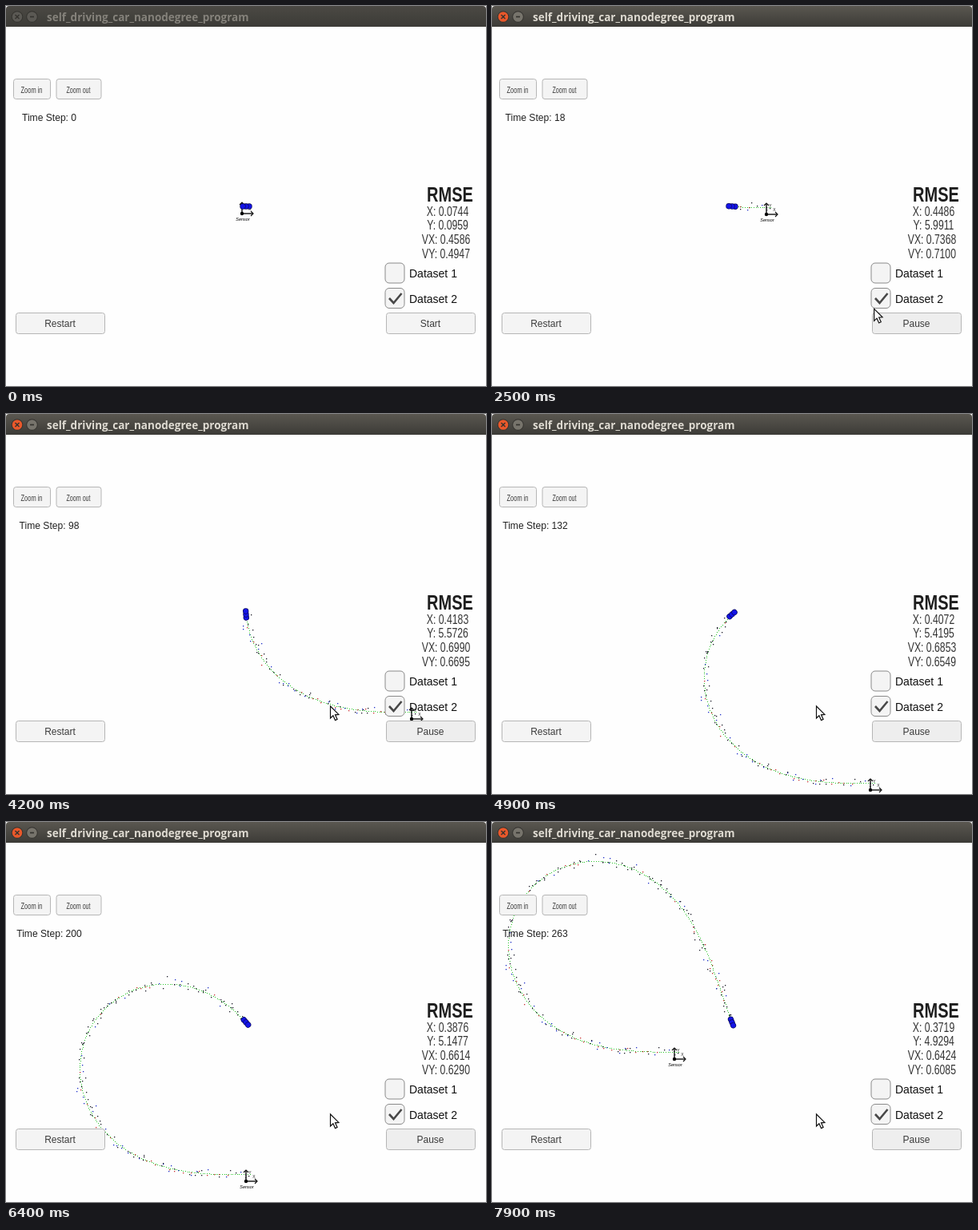
An HTML page with a canvas that plays this animation: 600x476 px, repeating every 8 s.

```html
<!DOCTYPE html>
<html lang="en">
<head>
<meta charset="utf-8">
<title>Tracking simulator</title>
<style>
html, body { margin: 0; width: 100%; height: 100%; overflow: hidden; background: #fefefe; }
canvas { display: block; }
</style>
</head>
<body>
<canvas id="stage" width="600" height="476"></canvas>
<script>
const ctx = document.getElementById('stage').getContext('2d');
const LOOP = 8000, TICK = 100, START = 2100, LAST_STEP = 270;
const CENTER = { x: 300, y: 251 };
const SANS = '"Liberation Sans", Arial, sans-serif';

// The pointer rests between glides: start, end, from, to
const GLIDES = [
  [100, 700, [82, 7], [558, 233]],
  [1000, 1700, [558, 233], [524, 388]],
  [2200, 2900, [524, 388], [405, 366]]
];

// RMSE is a large squared error diluted over the steps: idle value, initial sum, growth per step
const ERRORS = {
  X: [.0744, 103.1, .0066],
  Y: [.0959, 18413, .02],
  VX: [.4586, 276, .14],
  VY: [.4947, 257, .09]
};

const random = n => { const x = Math.sin(n * 127.1 + 3.7) * 43758.5453; return x - Math.floor(x); };
const spread = n => random(n) + random(n + .31) + random(n + .67) - 1.5;

// The car's yaw swings as a cosine, and it is a little faster in the middle of the turn
function drive() {
  const track = [];
  let x = 5, y = -9;
  for (let i = 0; i <= LAST_STEP; i++) {
    const phase = Math.PI * (i + .5) / 248;
    const heading = Math.PI + 2.19 * (1 - Math.cos(phase));
    const speed = 2.69 + .23 * Math.sin(phase) ** 2;
    const radar = i % 2, noise = radar ? 7.5 : 4;
    track.push({
      x, y, heading,
      mx: x + spread(i + 1000) * noise,
      my: y + spread(i + 2000) * noise,
      shown: random(i + 3000) < .8,
      color: random(i + 4000) < .62 ? '#1c1c28' : radar ? '#2030c8' : '#c83030'
    });
    x += speed * Math.cos(heading);
    y += speed * Math.sin(heading);
  }
  return track;
}
const track = drive();

function stepAt(t) {
  const s = Math.max(0, t - START) / 1000;
  return Math.round(s * (47 - .2 * (s - 2.9) ** 2));
}

function cursorAt(t) {
  const [start, end, from, to] = GLIDES.findLast(g => t >= g[0]);
  const u = Math.min(1, (t - start) / (end - start));
  const eased = u * u * (3 - 2 * u);
  return from.map((v, k) => v + (to[k] - v) * eased);
}

function text(str, x, y, font, color, condense = 1, align = 'center') {
  ctx.save();
  ctx.translate(x, y);
  ctx.scale(condense, 1);
  ctx.font = font;
  ctx.fillStyle = color;
  ctx.textAlign = align;
  ctx.fillText(str, 0, 0);
  ctx.restore();
}

function box(x, y, w, h, r, fill, stroke) {
  ctx.beginPath();
  ctx.roundRect(x, y, w, h, r);
  ctx.fillStyle = fill;
  ctx.fill();
  if (!stroke) return;
  ctx.strokeStyle = stroke;
  ctx.lineWidth = 1;
  ctx.stroke();
}

function disc(x, y, r, fill) {
  ctx.beginPath();
  ctx.arc(x, y, r, 0, Math.PI * 2);
  ctx.fillStyle = fill;
  ctx.fill();
}

function lines(points, color, width) {
  ctx.beginPath();
  points.forEach(p => ctx.lineTo(...p));
  ctx.strokeStyle = color;
  ctx.lineWidth = width;
  ctx.stroke();
}

function dot(x, y, size, color) {
  ctx.fillStyle = color;
  ctx.fillRect(Math.round(x), Math.round(y), size, size);
}

function drawSensor(x, y) {
  ctx.save();
  ctx.translate(Math.round(x), Math.round(y));
  for (const side of [1, -1]) {
    ctx.save();
    if (side < 0) ctx.rotate(-Math.PI / 2);
    lines([[0, 0], [13, 0]], '#111', 1.4);
    lines([[11, -3], [14, 0], [11, 3]], '#111', 1.2);
    ctx.restore();
  }
  disc(0, 0, 2.2, '#000');
  text('Y', 5, -9, `5px ${SANS}`, '#222');
  text('X', 10, -4, `5px ${SANS}`, '#222');
  text('Sensor', 1, 8.5, `italic 5.5px ${SANS}`, '#000');
  ctx.restore();
}

function drawCar(heading) {
  ctx.save();
  ctx.translate(CENTER.x, CENTER.y);
  ctx.rotate(heading);
  for (const x of [-4, 0, 4]) {
    disc(x, 0, 3.7, '#08085c');
    disc(x, 0, 3, '#1414e6');
  }
  ctx.restore();
}

function drawWorld(step, running) {
  const car = track[step], sx = CENTER.x - car.x, sy = CENTER.y - car.y;
  drawSensor(sx, sy);
  if (running) {
    for (const p of track.slice(0, step + 1)) {
      dot(sx + p.x, sy + p.y, 1, '#2fc62f');
      if (p.shown) dot(sx + p.mx, sy + p.my, 1.3, p.color);
    }
  }
  drawCar(car.heading);
}

function titleButton(x, color, height) {
  disc(x, 13.5, 7.2, '#33322e');
  disc(x, 13.5, 6.3, color);
  lines([[x - 2.5, 13.5 - height], [x + 2.5, 13.5 + height]], '#35332f', 1.4);
  lines([[x - 2.5, 13.5 + height], [x + 2.5, 13.5 - height]], '#35332f', 1.4);
}

function drawTitle(active) {
  const bar = ctx.createLinearGradient(0, 0, 0, 26);
  bar.addColorStop(0, active ? '#5a5750' : '#4b4944');
  bar.addColorStop(1, '#3c3b37');
  box(0, 0, 600, 26, [4, 4, 0, 0], bar);
  titleButton(14, active ? '#e9582b' : '#5b5954', 2.5);
  titleButton(32.5, active ? '#77746c' : '#5b5954', 0);
  text('self_driving_car_nanodegree_program', 51, 18.5, 'bold 13.5px "Open Sans", sans-serif',
    active ? '#dfdbd2' : '#85827b', 1, 'left');
}

function button(label, x, y, w, h, font, condense = 1, fill = '#f4f4f4') {
  box(x + .5, y + .5, w, h, 3, fill, '#b6b6b6');
  text(label, x + w / 2, y + h / 2 + 5, font, '#3c3c3c', condense);
}

function checkbox(label, y, checked) {
  box(474, y, 24, 25, 5, '#f4f4f4', '#8a8a8a');
  if (checked) lines([[479, y + 12.5], [484.5, y + 18.5], [494.5, y + 6.5]], '#484848', 2.6);
  text(label, 504, y + 18, `14px ${SANS}`, '#111', 1, 'left');
}

function drawPanel(step, running) {
  button('Zoom in', 9, 91, 46, 25, `11.5px ${SANS}`, .65);
  button('Zoom out', 62.5, 91, 56, 25, `11.5px ${SANS}`, .62);
  text('Time Step: ' + step, 54, 143.5, `13px ${SANS}`, '#222', .93);

  text('RMSE', 555, 244.5, `bold 26px ${SANS}`, '#1e1e1e', .77);
  Object.entries(ERRORS).forEach(([name, [idle, sum, growth]], i) => {
    const value = running ? Math.sqrt((sum + growth * step) / (495 + step)) : idle;
    text(`${name}: ${value.toFixed(4)}`, i < 2 ? 552 : 550, 262.5 + i * 17.7, `16px ${SANS}`, '#333', .765);
  });

  checkbox('Dataset 1', 322, false);
  checkbox('Dataset 2', 353.5, true);
  button('Restart', 12, 384, 111, 26, `12px ${SANS}`);
  button(running ? 'Pause' : 'Start', 475, 384, 111, 26, `12px ${SANS}`, 1, running ? '#eee' : '#f4f4f4');
}

function drawCursor(x, y) {
  ctx.save();
  ctx.translate(x + .5, y);
  ctx.beginPath();
  [[0, 0], [0, 15], [3.4, 11.8], [6, 17.6], [8.6, 16.4], [6, 10.8], [10.4, 10.4]].forEach(p => ctx.lineTo(...p));
  ctx.closePath();
  ctx.fillStyle = '#fff';
  ctx.fill();
  ctx.strokeStyle = '#111';
  ctx.lineWidth = 1.2;
  ctx.stroke();
  ctx.restore();
}

function draw(now) {
  const t = Math.floor(now % LOOP / TICK) * TICK;
  const running = t >= START + TICK;
  const step = stepAt(t);
  ctx.fillStyle = '#fefefe';
  ctx.fillRect(0, 0, 600, 476);
  drawWorld(step, running);
  drawPanel(step, running);
  drawTitle(t >= START);
  if (t >= GLIDES[0][0]) drawCursor(...cursorAt(t));
}

const begin = performance.now();
function frame() {
  draw(performance.now() - begin);
  requestAnimationFrame(frame);
}
frame();
</script>
</body>
</html>
```
